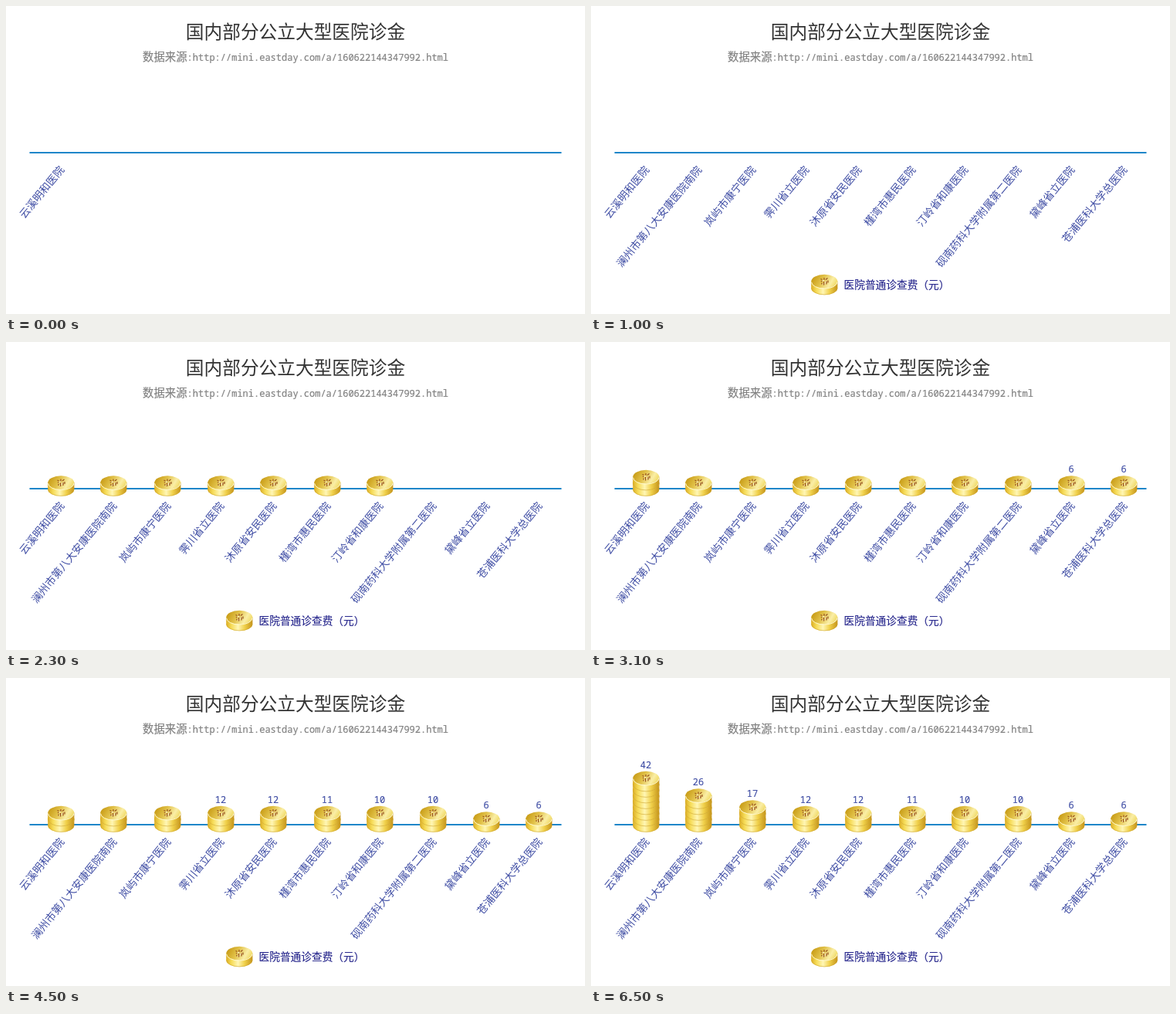
An HTML page for the animation above (8000 ms loop, 750x399 px).

```html
<!DOCTYPE html>
<html lang="zh-CN">
<head>
<meta charset="utf-8">
<style>
html, body { margin: 0; width: 100%; height: 100%; overflow: hidden; background: #fff; }
svg { display: block; width: 750px; height: 399px; }
text { font-family: "Noto Sans CJK SC", "Noto Sans CJK", sans-serif; font-size: 13.7px; fill: #3f4da4; }
.title { font-size: 23.7px; fill: #333; text-anchor: middle; }
.sub { font-size: 14.4px; fill: #808080; stroke: #808080; stroke-width: .2; text-anchor: middle; }
.mono { font-family: "Noto Sans Mono", "DejaVu Sans Mono", monospace; font-size: 12px; }
.value { text-anchor: middle; stroke: #3f4da4; stroke-width: .15; }
.label { text-anchor: end; }
.legend { fill: #26268c; stroke: #26268c; stroke-width: .15; }
</style>
</head>
<body>
<svg viewBox="0 0 750 399">
  <defs>
    <linearGradient id="face" x1="0" y1=".35" x2="1" y2=".65">
      <stop offset="0" stop-color="#c79a14"/>
      <stop offset=".4" stop-color="#e2c24a"/>
      <stop offset=".75" stop-color="#faeea6"/>
      <stop offset="1" stop-color="#efd75e"/>
    </linearGradient>
    <linearGradient id="side">
      <stop offset="0" stop-color="#dcae24"/>
      <stop offset=".2" stop-color="#f6dc58"/>
      <stop offset=".45" stop-color="#fff6b4"/>
      <stop offset=".7" stop-color="#f0d04a"/>
      <stop offset="1" stop-color="#c4931a"/>
    </linearGradient>
    <g id="coin">
      <path d="M.2 9V18A17.1 8.8 0 0 0 34.4 18V9Z" fill="url(#side)"/>
      <path d="M.5 17.6A16.8 8.8 0 0 0 34.1 17.6" fill="none" stroke="#cfa632" stroke-width=".6"/>
      <ellipse cx="17.3" cy="9.2" rx="17" ry="8.9" fill="url(#face)"/>
      <path d="M.6 10A16.7 8.6 0 0 0 34 10" fill="none" stroke="#fff9cf" stroke-width="1"/>
      <path d="M14.5 9l2.5-1.5M18 12l1.5-3M14.8 12.5h2" fill="none" stroke="#fff6c8" stroke-width="1.2"/>
      <path d="M12.5 6l2 1M12.8 9h1.8M14 11v2M17 4.5v3M16.6 9.5v4.5M19 7l2.5-2M20 9v4M22 8v3" fill="none" stroke="#96501f" stroke-width="1.2"/>
    </g>
  </defs>
  <text class="title" x="375" y="41.7">国内部分公立大型医院诊金</text>
  <text class="sub" x="375" y="71.3">数据来源<tspan class="mono">:http://mini.eastday.com/a/160622144347992.html</tspan></text>
  <path d="M30.5 190H719.5" stroke="#1f86c9" stroke-width="2"/>
  <g id="chart"></g>
</svg>
<script>
const LOOP = 8000, PER_COIN = 5, PITCH = 7.5, COIN_TOP = 173;
const columns = [
  [54, 42, '云溪明和医院'],
  [122, 26, '澜州市第八大安康医院南院'],
  [192, 17, '岚屿市康宁医院'],
  [261, 12, '霁川省立医院'],
  [329, 12, '沐原省安民医院'],
  [399, 11, '槿湾市惠民医院'],
  [467, 10, '汀岭省和康医院'],
  [536, 10, '砚南药科大学附属第二医院'],
  [605, 6, '黛峰省立医院'],
  [673, 6, '苍浦医科大学总医院']
];
const chart = document.getElementById('chart');
const parts = [];

function add(start, tag, attrs, text = '') {
  const el = document.createElementNS('http://www.w3.org/2000/svg', tag);
  for (const key in attrs) el.setAttribute(key, attrs[key]);
  el.textContent = text;
  chart.append(el);
  parts.push({ el, start });
}

const addCoin = (start, x, y) => add(start, 'use', { href: '#coin', x, y });

columns.forEach(([x, , name], i) => add(i * 100, 'text', {
  class: 'label',
  transform: `translate(${x + 22.2} 212.5) rotate(-50.5)`
}, name));
addCoin(900, 285, 347.5);
add(900, 'text', { class: 'legend', x: 327.5, y: 366 }, '医院普通诊查费（元）');

// Coins land row by row; a column's value shows with its last coin.
let start = 1100;
for (let row = 0; row < 8; row++) {
  for (const [x, value] of columns) {
    const count = Math.floor(value / PER_COIN);
    if (row >= count) continue;
    const y = COIN_TOP - row * PITCH;
    addCoin(start, x, y);
    if (row === count - 1) add(start, 'text', { class: 'value mono', x: x + 17, y: y - 3.8 }, value);
    start += 200;
  }
}

const origin = performance.now();
function draw(now) {
  const t = Math.max(0, now - origin) % LOOP;
  for (const { el, start } of parts) el.style.display = t >= start ? '' : 'none';
  requestAnimationFrame(draw);
}
draw(origin);
</script>
</body>
</html>
```
